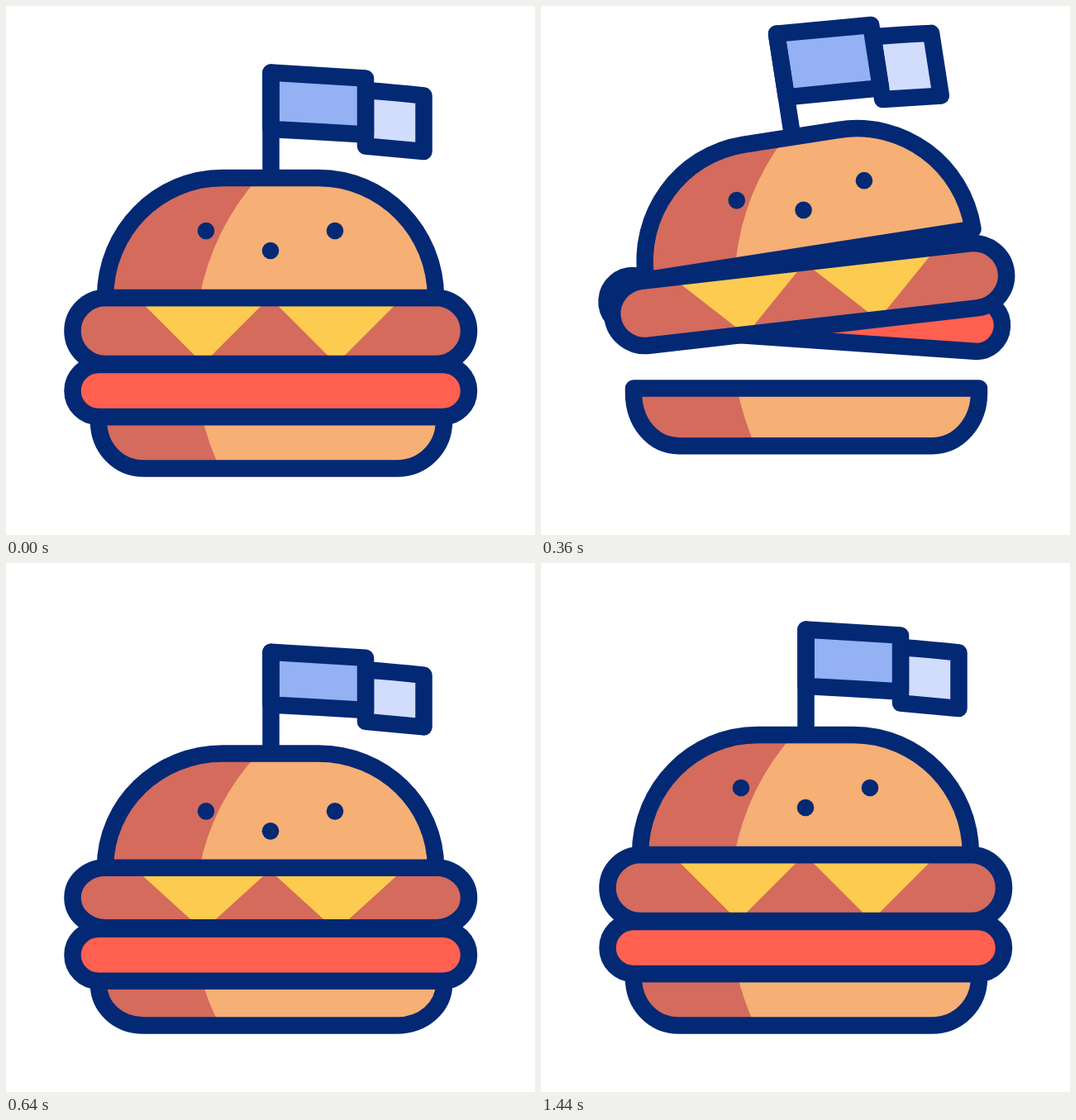
These frames come from a looping animation (640 px wide and 640 px high, 1.48 s). An HTML page with a canvas:

```html
<!DOCTYPE html>
<html lang="en">
<head>
<meta charset="utf-8">
<title>Burger</title>
<style>
  html, body { margin: 0; height: 100%; overflow: hidden; background: #fff; }
  canvas { display: block; width: 100vmin; height: 100vmin; }
</style>
</head>
<body>
<canvas width="640" height="640"></canvas>
<script>
const LOOP = 1480;
const PEAK = 303, LAND = 575, REST = 720;
const WAVE_START = 700, WAVE_PEAK = 990, WAVE_END = 1450;

const NAVY = '#032975', BROWN = '#d46b5d', BUN = '#f6af74', RED = '#ff6050';
const CHEESE = '#fdcb50', FLAG = '#93b1f3', FLAG_TIP = '#d2dcfc';

const ctx = document.querySelector('canvas').getContext('2d');

const TOP_BUN = 'M120 353C120 272 184 208 262 208H378C456 208 520 272 520 353Z';
const TOP_SHADE = 'M322 190L305 208Q250 270 234 353V400H60V150H322Z';
const PATTY = 'M120.5 353H520a40 40 0 0 1 0 80H120.5a40 40 0 0 1 0-80Z';
const SLICES = 'M138.5 333H338.5L238.5 433ZM299.5 333H499.5L399.5 433Z';
const TOMATO = 'M112 434H528.5a31.5 31.5 0 0 1 0 63H112a31.5 31.5 0 0 1 0-63Z';
const BASE_BUN = 'M112 497H530V502C530 534 505 559.5 473 559.5H167C135 559.5 112 534 112 502Z';
const BASE_SHADE = 'M237 497Q245 530 259 559.5H100V497Z';

// Cubic easing with control points (x1, 0) and (x2, 1).
function ease(x, x1 = 1 / 3, x2 = 2 / 3) {
  if (x <= 0) return 0;
  if (x >= 1) return 1;
  let lo = 0, hi = 1;
  for (let i = 0; i < 20; i++) {
    const u = (lo + hi) / 2, v = 1 - u;
    if (3 * v * v * u * x1 + 3 * v * u * u * x2 + u * u * u < x) lo = u; else hi = u;
  }
  return lo * lo * (3 - 2 * lo);
}

const progress = (t, from, to) => ease((t - from) / (to - from));

const shift = (x, y) => new DOMMatrix().translate(x, y);

const turn = (m, angle, x, y) => m.translate(x, y).rotate(angle).translate(-x, -y);

const squeeze = (m, s, y) => m.translate(0, y).scale(1, s).translate(0, -y);

function place(d, m) {
  const path = new Path2D();
  path.addPath(new Path2D(d), m);
  return path;
}

// Transforms the outline but keeps an even line weight.
function part(d, m, fill, inlay, inlayFill, inlayMatrix = m) {
  const path = place(d, m);
  ctx.fillStyle = fill;
  ctx.fill(path);
  if (inlay) {
    ctx.save();
    ctx.clip(path);
    ctx.fillStyle = inlayFill;
    ctx.fill(place(inlay, inlayMatrix));
    ctx.restore();
  }
  ctx.stroke(path);
}

function drawFlag(m, stretch, wave) {
  const hump = 22 * wave, dip = 12 * wave;
  part(`M435 102Q474 ${105 + dip} 505.5 108.5V${176 + stretch}
    Q474 ${173 + stretch + dip} 435 ${169.5 + stretch}Z`, m, FLAG_TIP);
  part(`M320.5 80.5Q378 ${84 - hump} 435 87.5V${155.5 + stretch}
    Q378 ${152 + stretch - hump} 320.5 ${149 + stretch}Z`, m, FLAG);
  ctx.stroke(place('M320.5 80.5V208', m));
}

function drawSeeds(m) {
  ctx.fillStyle = NAVY;
  for (const [x, y] of [[242, 272], [398, 272], [320, 296]]) {
    const p = m.transformPoint({ x, y });
    ctx.beginPath();
    ctx.arc(p.x, p.y, 10.3, 0, 2 * Math.PI);
    ctx.fill();
  }
}

function draw(t) {
  const fall = progress(t, PEAK, LAND);
  const lift = ease(t / PEAK, 0.8, 0.67) - fall;
  const squash = fall - progress(t, LAND, REST);
  const wave = progress(t, WAVE_START, WAVE_PEAK) - progress(t, WAVE_PEAK, WAVE_END);

  ctx.fillStyle = '#fff';
  ctx.fillRect(0, 0, 640, 640);
  ctx.strokeStyle = NAVY;
  ctx.lineWidth = 20.5;
  ctx.lineJoin = ctx.lineCap = 'round';

  const baseTop = 497 - 41 * lift + 14 * squash;
  const baseBottom = 559.5 - 31 * lift;
  const base = squeeze(shift(0, baseBottom - 559.5), (baseBottom - baseTop) / 62.5, 559.5);
  part(BASE_BUN, base, BUN, BASE_SHADE, BROWN);

  const tomato = turn(shift(-1.7 * lift, -108 * lift + 15.5 * squash), 4.5 * lift, 320, 465.5);
  part(TOMATO, tomato, RED);

  const patty = turn(shift(5 * lift, -52.5 * lift + 21 * squash), -7.4 * lift, 320, 393);
  const flat = 1 - 0.16 * squash;
  part(PATTY, squeeze(patty, flat, 393), BROWN, SLICES, CHEESE, squeeze(patty, flat, 433));

  const bunAt = (x, y, angle = 10) =>
    turn(shift(x * lift, -62.5 * lift + y * squash), -angle * lift, 320, 312);
  drawFlag(bunAt(0, 48), 11.5 * lift - 8.5 * squash, wave);

  const domed = m => squeeze(m, 1 - 0.083 * squash, 353);
  part(TOP_BUN, domed(bunAt(-1.5, 27.7)), BUN, TOP_SHADE, BROWN, domed(bunAt(-2, 27.7, 5)));
  drawSeeds(bunAt(0, 50));
}

const start = performance.now();

function tick() {
  draw((performance.now() - start) % LOOP);
  requestAnimationFrame(tick);
}
tick();
</script>
</body>
</html>
```
